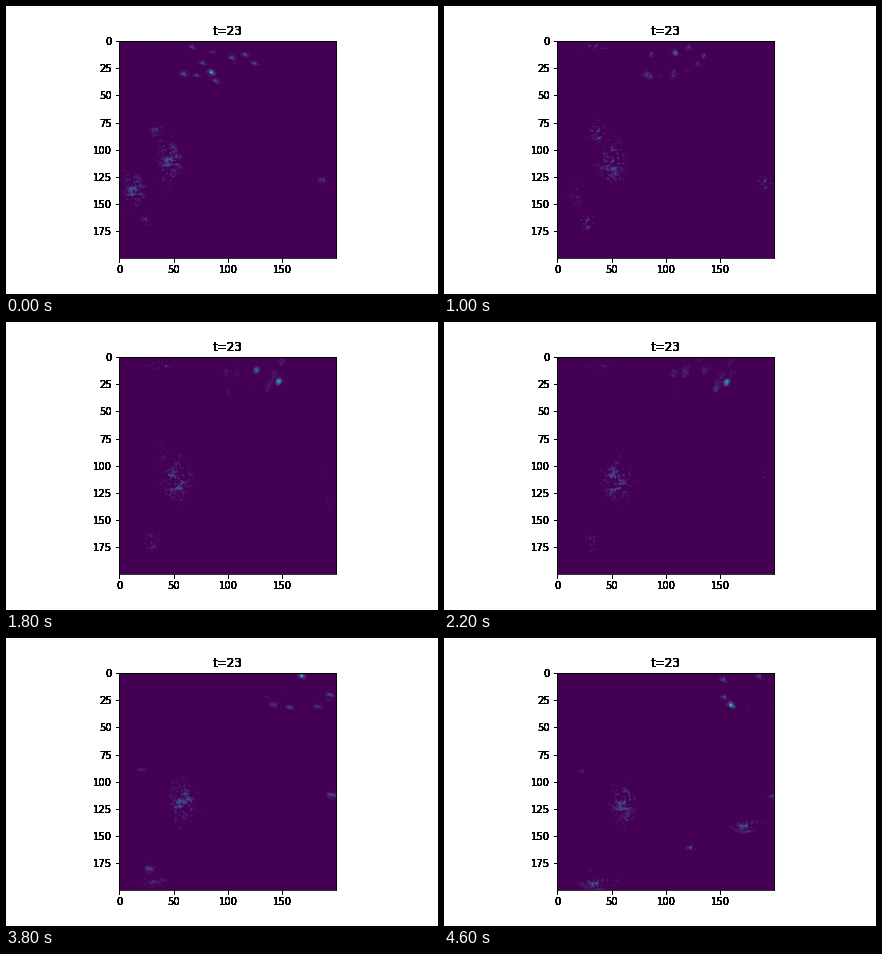
A matplotlib script that plays this animation: 432x288 px, repeating every 4800 ms.

```python
import numpy as np
import matplotlib.pyplot as plt
from matplotlib.animation import FuncAnimation

N = 200          # grid size
FRAMES = 24
STEP = 200       # ms
WIND = 4.5, .2   # drift of the northern storms, cells per frame
BREEZE = .6, .5  # drift of the slow rain areas

# Storms: time of greatest strength, and x, y at that time.
STORMS = [(0, 84, 29), (2, 68, 31), (7, 117, 12), (10, 151, 23),
          (14, 159, 30), (19, 167, 3), (23, 159, 30)]

# Rain areas: time, x, y, width, height, life.
AREAS = [
    (10, 53, 114, 8, 12, 60),
    (4, 36, 84, 5, 6, 5),
    (0, 14, 136, 7, 10, 5),
    (6, 28, 167, 4, 5, 7),
    (23, 36, 194, 11, 4, 4),
    (21, 22, 90, 4, 3, 2),
    (18, 27, 179, 3, 4, 4),
    (7, 36, 7, 8, 2, 5),
    (18, 194, 112, 3, 3, 9),
    (4, 189, 130, 4, 4, 5),
    (23, 173, 141, 9, 5, 1.5),
    (23, 122, 161, 3, 2, 1),
]

rng = np.random.default_rng(7)
Y, X = np.mgrid[:N, :N]


def smooth_noise(sigma):
    """Periodic Gaussian-filtered noise with unit spread."""
    f = np.fft.fftfreq(N)
    low = np.exp(-2 * (np.pi * sigma) ** 2 * (f[:, None] ** 2 + f ** 2))
    z = np.fft.ifft2(np.fft.fft2(rng.normal(size=(N, N))) * low).real
    return z / z.std()


FINE = [smooth_noise(.6) for _ in range(2)]
COARSE = [smooth_noise(2) for _ in range(2)]


def texture(pair, i, x, y):
    """Noise carried along with a cell while it slowly changes."""
    a = i * .3
    z = np.cos(a) * pair[0] + np.sin(a) * pair[1]
    return np.roll(z, (round(y), round(x)), axis=(0, 1))


def bell(dt, life):
    return np.exp(-(dt / life) ** 2)


def make_specks(count=24):
    """Short-lived faint cells scattered along the storm belt."""
    t = rng.uniform(-2, FRAMES, count)
    x = 90 + 4 * t + rng.uniform(-35, 35, count)
    y = rng.uniform(4, 38, count)
    return list(zip(t, x, y))


SPECKS = make_specks()


def add_cell(field, i, start, drift, size, strength, grain):
    t, x, y = start
    cx, cy = x + drift[0] * (i - t), y + drift[1] * (i - t)
    fine = texture(FINE, i, cx, cy)
    coarse = texture(COARSE, i, cx, cy)
    r2 = ((X - cx) / size[0]) ** 2 + ((Y - cy) / size[1]) ** 2
    body = np.exp(-r2 / 2 * np.exp(.5 * coarse))
    rain = 1 - grain + grain * np.clip(.3 + .5 * coarse + .6 * fine, 0, 1.4)
    np.maximum(field, strength * body * rain - .02, out=field)


def rain(i):
    field = np.zeros((N, N))
    for t, x, y, w, h, life in AREAS:
        add_cell(field, i, (t, x, y), BREEZE, (w, h), .24 * bell(i - t, life), 1)
    for speck in SPECKS:
        add_cell(field, i, speck, WIND, (2.4, 2), .25 * bell(i - speck[0], 3), .7)
    for storm in STORMS:
        dt = i - storm[0]
        add_cell(field, i, storm, WIND, (3, 2.6), .22 * bell(dt, 8), .7)
        add_cell(field, i, storm, WIND, (1.4, 1.5), .75 * bell(dt, 2) + .15 * bell(dt, 8), .2)
    return field


plt.rcParams.update({"figure.subplot.bottom": .125, "font.family": "DejaVu Sans", "font.size": 10})
fig, ax = plt.subplots(figsize=(6, 4), dpi=72)
image = ax.imshow(rain(0), cmap="viridis", vmin=0, vmax=1)

# Repeated transparent axes give the labels their heavy edges.
for _ in range(9):
    layer = fig.add_subplot(111, aspect="equal", xlim=ax.get_xlim(), ylim=ax.get_ylim())
    layer.patch.set_visible(False)
    layer.spines[["right", "bottom"]].set_visible(False)
for a in fig.axes:
    a.set(title="t=23", xticks=range(0, N, 50), yticks=range(0, N, 25))


def update(i):
    image.set_data(rain(i))
    return [image]


anim = FuncAnimation(fig, update, frames=FRAMES, interval=STEP, repeat=True, repeat_delay=0)
plt.show()
```
